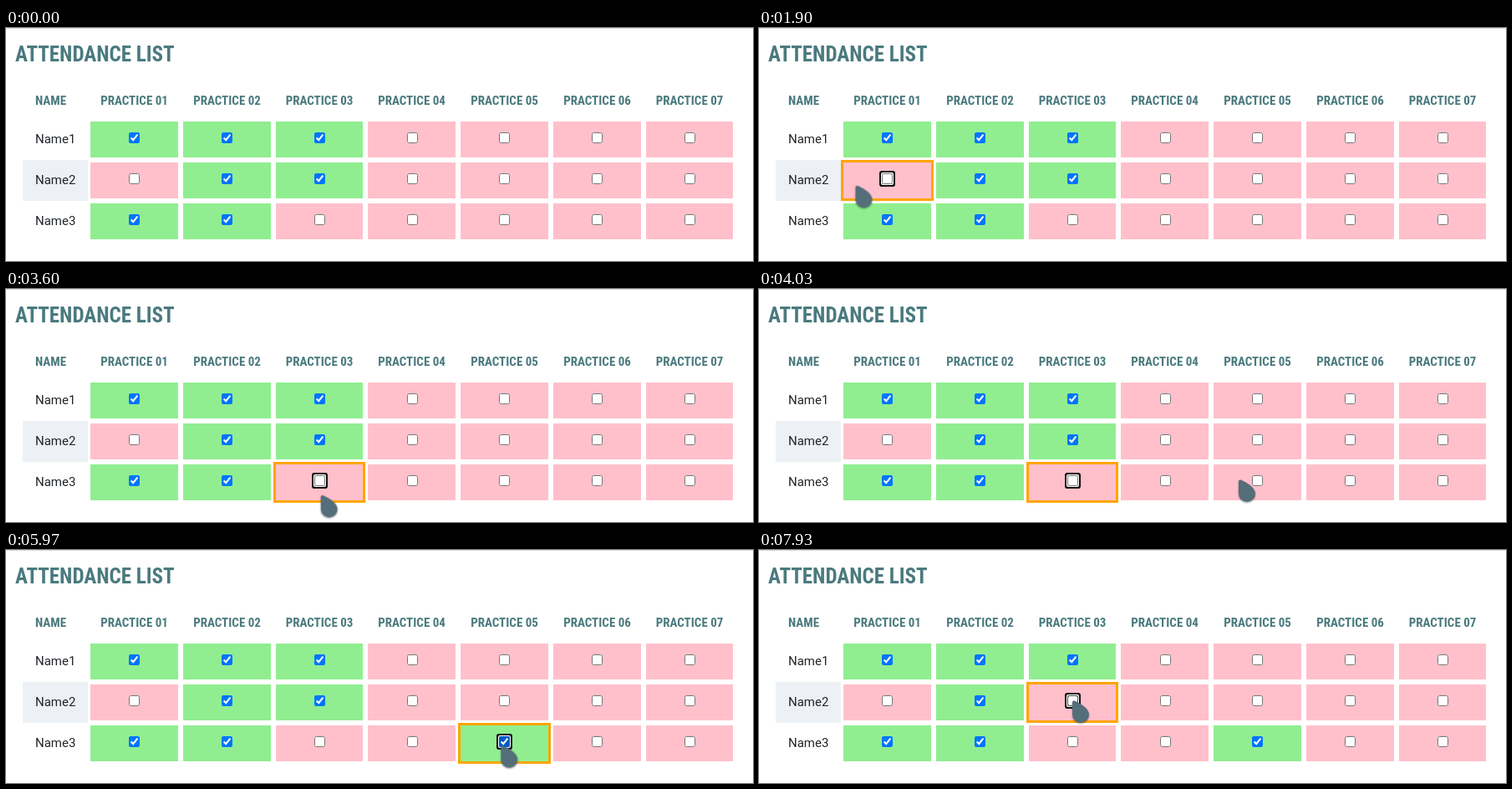
An HTML page for the animation above (8000 ms loop, 894 by 279 pixels).

```html
<!DOCTYPE html>
<html lang="en">
<head>
<meta charset="utf-8">
<title>Attendance list</title>
<style>
  html, body { margin: 0; width: 100%; height: 100%; overflow: hidden; background: #fff; }
  body { position: relative; font: 15px/48px Roboto, sans-serif; color: #212529; }
  #stage { position: absolute; inset: 0; width: 894px; height: 279px; overflow: hidden; border-top: 1px solid #ddd; box-sizing: border-box; }
  #sheet { position: absolute; left: 0; top: -1px; }
  #sheet * { position: absolute; box-sizing: border-box; margin: 0; white-space: nowrap; }
  h1, .head {
    font-family: "Roboto Condensed", Roboto, sans-serif;
    font-stretch: 75%; font-weight: 700; color: #4a7a7e;
  }
  h1 { left: 11px; top: 6px; font-size: 25px; line-height: 51px; }
  .head { top: 63px; text-align: center; }
  .name { left: 20px; width: 78px; height: 49px; padding-left: 15px; }
  .name.active { background: #edf1f5; }
  .cell { height: 43px; background: #ffc0cb; }
  .cell.on { background: #90ee90; }
  input { width: 13px; height: 13px; pointer-events: none; }
  .frame { height: 49px; border: 3px solid #ffa500; }
  .ring, .rim { width: 13px; height: 13px; }
  .ring { border-radius: 1px; box-shadow: 0 0 0 1px #fff, 0 0 0 3px #101010; }
  .rim { border: 1px solid #4f4f4f; border-radius: 2.5px; }
  .timed { opacity: 0; }
  #pointer {
    left: 0; top: 0; width: 20px; height: 27px; overflow: visible;
    filter: drop-shadow(0 1px 1px rgba(0, 0, 0, .4));
    animation: roam 8s infinite ease-in-out;
  }
  @keyframes roam {
    0%, 5.875% { transform: translate(92px, 284px); animation-timing-function: ease-out; }
    10.375%, 23.375% { transform: translate(114px, 188px); }
    30.375%, 43.75% { transform: translate(361px, 248px); }
    50.375%, 59.25% { transform: translate(574px, 228px); }
    61.875% { transform: translate(587px, 242px); }
    64.625%, 67.874% { transform: translate(592px, 236px); }
    67.875%, 74.25% { transform: translate(593px, 234px); }
    82.875%, 88% { transform: translate(411px, 185px); }
    91.25%, 100% { transform: translate(375px, 180px); }
  }
</style>
</head>
<body>
<div id="stage"><div id="sheet">
  <h1>ATTENDANCE LIST</h1>
</div></div>
<script>
const LOOP = 8000, COLS = 7;
const sheet = document.getElementById('sheet');
const colX = c => Math.round(98 + 110.77 * c);
const rowY = r => 109 + 49 * r;
const boxX = c => Math.round(147.2 + 110.77 * c);

function add(tag, cls, x, y, w, text) {
  const el = document.createElement(tag);
  el.className = cls;
  if (x !== null) el.style.left = x + 'px';
  if (y !== null) el.style.top = y + 'px';
  if (w) el.style.width = w + 'px';
  if (text) el.textContent = text;
  return sheet.appendChild(el);
}

function box(r, c, checked, accent) {
  const el = add('input', '', boxX(c), rowY(r) + 16);
  el.type = 'checkbox';
  el.tabIndex = -1;
  el.checked = checked;
  if (accent) el.style.accentColor = accent;
  return el;
}

function cell(r, c, on) {
  const x = colX(c) + 3;
  return [add('div', on ? 'cell on' : 'cell', x, rowY(r) + 3, colX(c + 1) - 3 - x), box(r, c, on)];
}

// Visible only between two times, with hard switches.
function show(from, to, ...els) {
  const key = (opacity, ms) => ({ opacity, offset: ms / LOOP, easing: 'step-end' });
  for (const el of els) {
    el.classList.add('timed');
    el.animate([key(0, 0), key(1, from), key(0, to), key(0, LOOP)],
      { duration: LOOP, iterations: Infinity });
  }
}

const mark = (cls, r, c) => add('div', cls, boxX(c), rowY(r) + 16);

function focus(r, c, from, to) {
  show(from, to,
    add('div', 'frame', colX(c), rowY(r), colX(c + 1) - colX(c)),
    mark('ring', r, c));
}

add('div', 'head', 35, null, 0, 'NAME');
for (let c = 0; c < COLS; c++)
  add('div', 'head', colX(c), null, colX(c + 1) - colX(c), 'PRACTICE 0' + (c + 1));

['1110000', '0110000', '1100000'].forEach((row, r) => {
  add('div', r === 1 ? 'name active' : 'name', null, rowY(r), 0, 'Name' + (r + 1));
  [...row].forEach((v, c) => cell(r, c, v === '1'));
});

// Toggled cells
show(5670, LOOP, ...cell(2, 4, true));
show(7930, LOOP, ...cell(1, 2, false));

// Hover and press shades
const HOVER = '#005cc8', PRESS = '#3793ff';
show(5430, 5570, mark('rim', 2, 4));
show(5670, 6030, box(2, 4, true, HOVER));
show(7230, 7830, box(1, 2, true, HOVER));
show(7830, 7930, box(1, 2, true, PRESS));
show(7930, LOOP, mark('rim', 1, 2));

focus(1, 0, 1330, 2800);
focus(2, 2, 2900, 4500);
focus(2, 4, 4600, 6770);
focus(1, 2, 6870, LOOP);

sheet.insertAdjacentHTML('beforeend',
  `<svg id="pointer" viewBox="0 0 20 27"><path fill="#546e7a"
    d="M0 2.5Q0 0 2.5 .5C9 3 20 10 20 17A10 10 0 0 1 0 17Z"/></svg>`);
</script>
</body>
</html>
```
